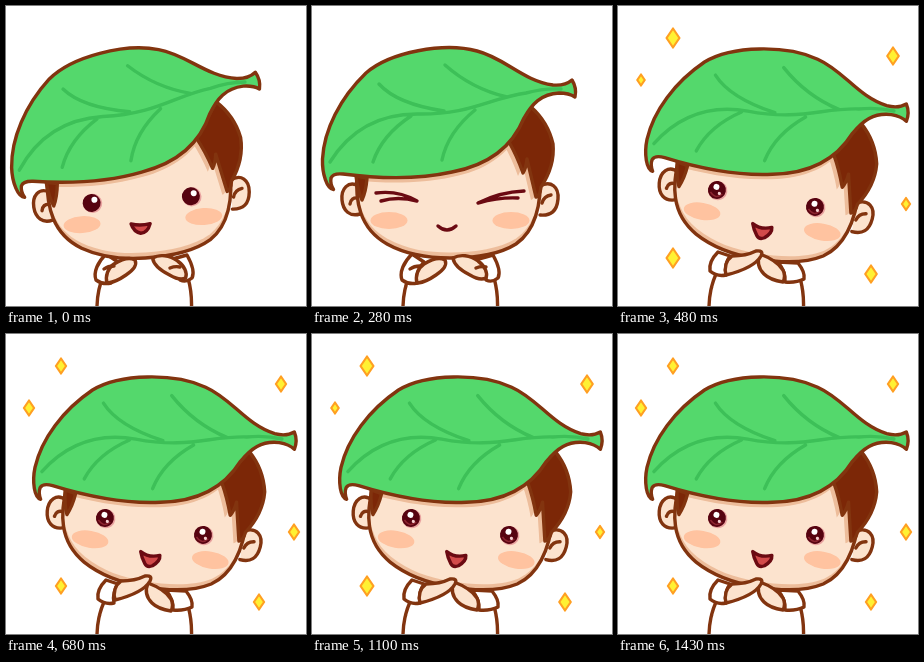
An HTML page that plays this animation: 300 by 300 pixels, repeating every 1.83 s.

```html
<!DOCTYPE html>
<html lang="en">
<head>
<meta charset="utf-8">
<title>Leaf hat</title>
<style>
html, body { margin: 0; width: 100%; height: 100%; overflow: hidden; background: #fff; }
svg { display: block; width: 100vw; height: 100vh; }
.line { fill: none; }
.ink { stroke: #82340f; stroke-width: 3.4; stroke-linejoin: round; stroke-linecap: round; }
.skin { fill: #fce3ce; }
.shade { fill: #edbd9b; }
.white { fill: #fff; }
.hair { fill: #7c2707; }
.vein { fill: none; stroke: #3dc058; stroke-width: 3.4; stroke-linecap: round; }
.dark { fill: none; stroke: #6b0a12; stroke-width: 3.4; stroke-linejoin: round; stroke-linecap: round; }
.open { fill: #560310; }
.mouth { fill: #d24a4a; }
.spark { fill: #fff133; stroke: #ff9f22; stroke-width: 2.2; stroke-linejoin: round; }
</style>
</head>
<body>
<svg viewBox="0 0 300 300">
  <defs>
    <path id="leafShape" d="M21.500 183.500C15 183 10 168 10.500 153C12 124 28 92 54 67C78 46 132 36 165 45C193 52 211 75 241 79Q253 80 260 74Q265 82 263 91Q257 87 247 87C229 88 220 98 212 112C199 144 172 160 140 166C104 174 62 172 31 168Q21 167 19 172Q18 178 21.500 183.500Z"/>
    <path id="faceShape" d="M45 165C43 195 47 222 75 238C95 249 115 252 138 252C163 252 188 248 204 238C224 224 230 198 228 165L205 120L60 150Z"/>
    <path id="hairShape" d="M197 136Q205 150 211 167Q214 162 215 153Q219 170 224 191Q228 190 229 181Q243 160 241 138Q236 116 219 101Z"/>
    <clipPath id="faceClip"><use href="#faceShape"/></clipPath>
  </defs>

  <g id="sparks"></g>
  <path class="ink line" d="M98 268Q91 284 91 302M182 272Q186 286 185.500 302"/>
  <g class="ink white" data-hands="apart">
    <path d="M100 248C92 256 87 266 90 274Q97 279 105 277Q103 266 112 256Z"/>
    <path d="M181 249C186 258 189 266 186 272Q180 277 174 274Q175 264 163 254Z"/>
  </g>
  <g class="ink white" data-hands="clasped">
    <path d="M100 246C94 252 91 259 92 265Q99 271 108 269Q106 258 112 250Z"/>
    <path d="M180 257C184 262 187 268 186 273Q178 277 167 276Q168 266 160 256Z"/>
  </g>

  <g id="head">
    <g class="ink skin">
      <path d="M47 180C36 174 29 183 30 194C31 205 38 211 48 208"/>
      <path d="M228 180C239 174 247 181 246 193C245 205 239 210 228 209"/>
      <path class="line" d="M38 198Q39 191 46 192M239 189Q232 190 230 197"/>
    </g>
    <use href="#faceShape" class="shade"/>
    <g clip-path="url(#faceClip)">
      <use href="#faceShape" class="skin" y="-5.500"/>
      <use href="#leafShape" class="shade" y="5"/>
      <use href="#hairShape" class="shade" x="-5" y="3"/>
      <g fill="#ffc3a0">
        <ellipse cx="77" cy="214.500" rx="18.500" ry="8.500"/>
        <ellipse cx="199" cy="214.500" rx="18.500" ry="8.500"/>
      </g>
    </g>
    <use href="#faceShape" class="ink line"/>
    <g class="ink hair">
      <use href="#hairShape"/>
      <path d="M44 170L55 172Q54 185 50 194Q46 186 44 170Z"/>
    </g>
    <use href="#leafShape" class="ink" fill="#54d86c"/>
    <path class="vein" d="M18 156C38 124 66 108 105 108C158 109 178 92 214 87Q232 82 249 83M67 78Q85 98 132 105M133 59Q160 83 195 91M61 156Q70 129 99 110M130 154Q136 126 163 104"/>

    <g data-eyes="open" id="openEyes"></g>
    <path class="dark" data-eyes="shut" d="M64 187Q86 184 105 195Q86 190 69 195M212 185Q188 186 166 197Q188 191 206 192"/>
    <path class="dark mouth" data-mouth="small" style="fill:#d24a4a" d="M126 217Q135 220 145 218Q142 227 135 227Q128 225 126 217Z"/>
    <path class="dark" data-mouth="smile" d="M126 220Q135 228 144 220"/>
    <path class="dark mouth" data-mouth="wide" d="M129 218Q138 223 148.500 218.500Q150 224 143 230Q138 233 135 229Q131 224 129 218Z"/>
  </g>

  <g class="ink skin" data-hands="apart">
    <path id="apartLeft" d="M105 277C103 270 106 262 112 258C120 253 128 251 133 254C136 260 130 265 124 269Q114 276 106 277Z"/>
    <path id="apartRight" d="M141 252C148 248 158 249 166 255C173 260 176 267 174 272Q168 275 158 269C150 265 142 260 141 252Z"/>
    <path class="line" d="M98 263Q102 260 108 260M164 262Q169 260 174 261"/>
  </g>
  <g class="ink skin" data-hands="clasped">
    <path id="claspRight" d="M142 248C150 251 160 256 165 264Q168 270 165 276Q152 274 146 268C140 262 139 255 142 248Z"/>
    <path id="claspLeft" d="M108 269C106 262 108 254 114 250C123 250 132 248 138 245Q146 244 143 250C138 259 124 265 108 269Z"/>
  </g>
</svg>
<script>
const LOOP = 1830;
const $ = id => document.getElementById(id);
const move = (id, x, y) => $(id).setAttribute("transform", `translate(${x} ${y})`);

// Head poses: x, y, degrees
const LEFT = [-15, 9.7, -3.8], MID = [-7.5, 5, -1.9], UPRIGHT = [0, 0, 0], RIGHT = [44.7, -19.2, 9.8];

// start, pose, eyes, mouth, hands, hand shift, sparkle phase
const steps = [
  [0, LEFT, "open", "small", "apart", 4, -1],
  [160, MID, "shut", "smile", "apart", 2, -1],
  [280, UPRIGHT, "shut", "smile", "apart", 0, -1],
  [400, RIGHT, "open", "wide", "clasped", 0, 0],
  [480, RIGHT, "open", "wide", "clasped", 0, 1],
  [680, RIGHT, "open", "wide", "clasped", 3, 0],
  [810, RIGHT, "open", "wide", "clasped", 0, 0],
  [940, RIGHT, "shut", "wide", "clasped", 3, 1],
  [1100, RIGHT, "open", "wide", "clasped", 0, 1],
  [1300, RIGHT, "open", "wide", "clasped", 3, 0],
  [1430, RIGHT, "open", "wide", "clasped", 0, 0]
];

// x, y, half height in each phase
const sparks = [
  [55, 32, 7.5, 9.5], [275, 50, 7.5, 8.5], [23, 74, 7.5, 5.5],
  [288, 198, 7.5, 6], [55, 252, 7.5, 9.5], [253, 268, 7.5, 8.5]
];

function diamond([x, y, ...sizes], phase) {
  const h = sizes[phase], w = h * .68;
  return `<path class="spark" d="M${x} ${y - h}l${w} ${h}l${-w} ${h}l${-w} ${-h}Z"/>`;
}

function eye(x, y, early) {
  const rim = `<circle cx="${x + 1}" cy="${y + .5}" r="9.6" fill="#e9a3a0"/>`;
  const ball = `<circle class="open" cx="${x}" cy="${y}" r="9"/>`;
  const shine = early
    ? `<circle cx="${x + 3}" cy="${y - 3}" r="3" fill="#fff"/>`
    : `<path d="M${x - 6} ${y + 3}Q${x} ${y + 10} ${x + 6} ${y + 3}" fill="none" stroke="#8c2430" stroke-width="1.5"/>
      <circle cx="${x - 1}" cy="${y - 3}" r="3" fill="#fff"/><circle cx="${x + 3}" cy="${y + 3}" r="1.6" fill="#f6cfd0"/>`;
  return rim + ball + shine;
}

function show(group, value) {
  for (const el of document.querySelectorAll(`[data-${group}]`))
    el.style.display = el.dataset[group] === value ? "" : "none";
}

function draw([, [x, y, turn], eyes, mouth, hands, shift, phase]) {
  $("head").setAttribute("transform", `translate(${x} ${y}) rotate(${turn})`);
  show("eyes", eyes);
  show("mouth", mouth);
  show("hands", hands);
  if (hands === "apart") {
    move("apartLeft", -shift, 0);
    move("apartRight", shift * 1.4, 0);
  } else {
    move("claspLeft", shift / 3, -shift);
    move("claspRight", 0, shift / 3);
  }
  const early = phase < 0, eyeY = early ? 193.5 : 191;
  $("openEyes").innerHTML = eye(88, eyeY, early) + eye(187.5, eyeY, early);
  $("sparks").innerHTML = early ? "" : sparks.map(s => diamond(s, phase)).join("");
}

let current;
function tick() {
  const t = performance.now() % LOOP;
  const step = steps.findLast(s => s[0] <= t);
  if (step !== current) draw(current = step);
  requestAnimationFrame(tick);
}
tick();
</script>
</body>
</html>
```
